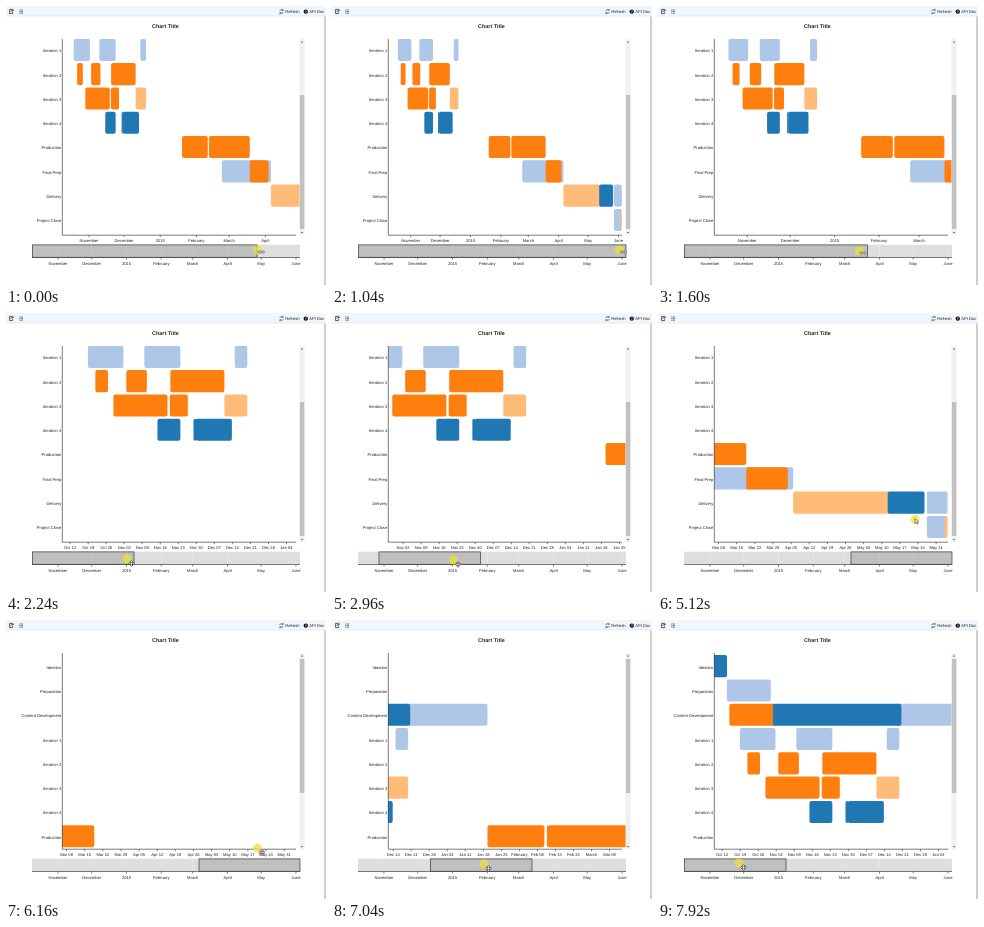
Write an HTML page that moves like this. It is 320 px wide and 279 px high and loops after 8000 ms.

```html
<!DOCTYPE html>
<html lang="en">
<head>
<meta charset="utf-8">
<title>Chart</title>
<style>
  html, body { margin: 0; width: 100%; height: 100%; overflow: hidden; background: #fff; }
  svg { display: block; width: 100%; height: 100%; }
  text { font: 4.1px "Liberation Sans", Arial, sans-serif; fill: #222; text-rendering: geometricPrecision; }
  .mid { text-anchor: middle; }
  .end { text-anchor: end; }
  .title { font-size: 5.4px; font-weight: bold; }
  .axis { fill: none; stroke: #444; stroke-width: .7; }
</style>
</head>
<body>
<svg viewBox="0 0 320 279">
  <defs>
    <clipPath id="plot"><rect x="56" y="32.8" width="238" height="196.2"/></clipPath>
    <clipPath id="names"><rect x="0" y="33" width="56" height="196"/></clipPath>
  </defs>
  <rect width="320" height="279" fill="#fff"/>

  <rect width="320" height="10" fill="#f1f6fc"/>
  <path d="M0 10H320" stroke="#d6dfe8" stroke-width=".6"/>
  <rect x="318" y="10.5" width="2" height="268.5" fill="#cfcfcf"/>
  <path d="M6 3.4H3.6V7.6H6.6V6.2M4.8 5.8Q5 4.2 7.4 4.2M6.2 3L7.5 4.2L6.2 5.4" fill="none" stroke="#333" stroke-width=".8"/>
  <path d="M13 4h.8M14.4 4h2.6M13 5.6h.8M14.4 5.6h2.6M13 7.2h.8M14.4 7.2h2.6" stroke="#444" stroke-width=".7"/>
  <path d="M273.7 5A1.9 1.9 0 0 1 277 4.2M277.2 2.8V4.5H275.5M277.3 6.1A1.9 1.9 0 0 1 274 6.9M273.8 8.3V6.6H275.5" fill="none" stroke="#444" stroke-width=".6"/>
  <text x="279.2" y="7.1">Refresh</text>
  <circle cx="299.8" cy="5.6" r="2.2" fill="#111"/>
  <text class="mid" x="299.8" y="6.9" style="font-size:3.5px;font-weight:bold;fill:#fff">?</text>
  <text x="303.2" y="7.1">API Doc</text>
  <text class="mid title" x="159.4" y="21.5">Chart Title</text>

  <g clip-path="url(#plot)"><g id="bars"></g></g>
  <g clip-path="url(#names)"><g id="labels"></g></g>
  <path class="axis" d="M56.3 33V229.2H290"/>
  <g id="ticks"></g>

  <rect x="293.5" y="33" width="5" height="196" fill="#f0f0f0"/>
  <rect id="thumb" x="293.9" width="4.4" height="134" fill="#c1c1c1"/>
  <path d="M294.9 36.4L296 35L297.1 36.4ZM294.9 226L296 227.4L297.1 226Z" fill="#555"/>

  <rect x="26" y="238.7" width="268" height="12.7" fill="#dedede"/>
  <g id="grid"></g>
  <rect id="brush" y="238.9" height="12.4" fill="#777" fill-opacity=".3" stroke="#444" stroke-width=".75"/>
  <path class="axis" d="M26 251.5H294"/>
  <g id="months"></g>

  <g id="pointer">
    <circle r="4.5" fill="#ece32c" fill-opacity=".7"/>
    <path id="resize" d="M.3 2L2.2 .5V1.4H5.4V.5L7.3 2L5.4 3.5V2.6H2.2V3.5Z" fill="#fff" stroke="#333" stroke-width=".5"/>
    <path id="move" d="M4.5 1.3L5.8 2.8H5V3.9H6.1V3.1L7.6 4.4L6.1 5.7V4.9H5V6H5.8L4.5 7.5L3.2 6H4V4.9H2.9V5.7L1.4 4.4L2.9 3.1V3.9H4V2.8H3.2Z" fill="#fff" stroke="#222" stroke-width=".5"/>
    <path id="arrow" d="M0 -1V4L1.2 2.9L2 4.7L2.8 4.3L2 2.6H3.6Z" fill="#fff" stroke="#222" stroke-width=".5"/>
  </g>
</svg>
<script>
const LOOP = 8000, STEP = 80, DAY = 864e5;
const EPOCH = Date.UTC(2014, 10, 1);
const LEFT = 56, WIDTH = 234, ROW = 24.3, MAX_SCROLL = 75.2;
const BLUE = '#1f77b4', SKY = '#aec7e8', ORANGE = '#ff7f0e', PEACH = '#ffbb78';

// Each task: colour, first day, last day, counted from November 1
const rows = [
  ['Ideation', [BLUE, -24, -18.1]],
  ['Preparation', [SKY, -18.2, -1.1]],
  ['Content Development', [SKY, 47, 79.6], [ORANGE, -17.2, 1], [BLUE, -.3, 49.6]],
  ['Iteration 1', [SKY, -13.1, .7], [SKY, 8.8, 22.8], [SKY, 43.9, 48.8]],
  ['Iteration 2', [ORANGE, -10.2, -5.3], [ORANGE, 1.8, 9.8], [ORANGE, 18.9, 39.9]],
  ['Iteration 3', [ORANGE, -3.2, 17.8], [ORANGE, 18.7, 25.7], [PEACH, 39.9, 48.8]],
  ['Iteration 4', [BLUE, 13.9, 22.8], [BLUE, 27.9, 29], [BLUE, 28.8, 42.8]],
  ['Production', [ORANGE, 79.6, 101.7], [ORANGE, 102.7, 137.7]],
  ['Final Prep', [SKY, 113.8, 155.8], [ORANGE, 137.7, 153.7]],
  ['Delivery', [PEACH, 155.8, 193.5], [BLUE, 192.3, 206.5], [SKY, 207.4, 215.4]],
  ['Project Close', [PEACH, 212, 215.4], [SKY, 207.4, 214.3]]
];

// Keyframes: time, then values
const edgeKeys = [[0, 251], [700, 294], [1080, 294], [2100, 128]];
const dragKeys = [[2800, 26], [3680, 139], [4160, 192.6], [6280, 192.6], [7040, 98], [7760, 26]];
const scrollKeys = [[5480, 1], [5840, 0]];
const pointerKeys = [
  [0, 251.5, 244], [700, 303, 244], [900, 303, 244], [1040, 287.5, 244], [2100, 124, 246],
  [2240, 121, 246], [2560, 101, 247], [2800, 101, 247], [3680, 214, 247], [4160, 267, 247],
  [4640, 262, 245], [5120, 257, 206.5], [5440, 294, 180], [5840, 296, 100],
  [6200, 246, 244], [6280, 246, 244], [7040, 152, 244], [7760, 81, 243]
];

const $ = id => document.getElementById(id);

function at(keys, t, k = 1) {
  if (t <= keys[0][0]) return keys[0][k];
  for (let i = 1; i < keys.length; i++) {
    const a = keys[i - 1], b = keys[i];
    if (t <= b[0]) return a[k] + (b[k] - a[k]) * (t - a[0]) / (b[0] - a[0]);
  }
  return keys[keys.length - 1][k];
}

const overviewX = d => 52 + 1.1226 * d;
const overviewDay = x => (x - 52) / 1.1226;

function tickLabel(date) {
  const name = month => date.toLocaleString('en-US', { month, timeZone: 'UTC' });
  if (date.getUTCDate() > 1) return name('short') + ' ' + String(date.getUTCDate()).padStart(2, '0');
  return date.getUTCMonth() ? name('long') : String(date.getUTCFullYear());
}

// Sundays for short spans, first days of months for long ones
function ticksFor(from, to) {
  const weekly = to - from < 145, list = [];
  for (let d = Math.ceil(from); d <= to; d++) {
    const date = new Date(EPOCH + d * DAY);
    if (weekly ? date.getUTCDay() === 0 : date.getUTCDate() === 1) list.push([d, tickLabel(date)]);
  }
  return list;
}

function axisMarkup(list, scale, y, labelY) {
  return list.map(([d, label]) => {
    const x = scale(d).toFixed(2);
    return `<path class="axis" d="M${x} ${y}v2"/><text class="mid" x="${x}" y="${labelY}">${label}</text>`;
  }).join('');
}

const months = ticksFor(-23.2, 215.6);
$('months').innerHTML = axisMarkup(months, overviewX, 251.5, 259);
$('grid').innerHTML = months.map(([d]) =>
  `<path d="M${overviewX(d)} 238.7v12.7" stroke="#ebebeb" stroke-width=".6"/>`).join('');
$('labels').innerHTML = rows.map(([name], i) =>
  `<text class="end" x="55.2" y="${48.6 + ROW * i}">${name}</text>`).join('');

function draw(t) {
  const left = at(dragKeys, t);
  const right = t < 2800 ? at(edgeKeys, t) : Math.min(294, left + 102);
  const from = overviewDay(left), to = overviewDay(right);
  const x = d => LEFT + (d - from) * WIDTH / (to - from);
  const scroll = at(scrollKeys, t);
  const shift = `translate(0 ${-scroll * MAX_SCROLL})`;

  $('bars').innerHTML = rows.map(([, ...tasks], i) => tasks.map(([color, a, b]) =>
    `<rect x="${x(a)}" y="${35.1 + ROW * i}" width="${x(b) - x(a)}" height="22.1" rx="2" fill="${color}"/>`
  ).join('')).join('');
  $('bars').setAttribute('transform', shift);
  $('labels').setAttribute('transform', shift);
  $('ticks').innerHTML = axisMarkup(ticksFor(from, to), x, 229.2, 236.2);
  $('thumb').setAttribute('y', 39 + 50 * scroll);

  $('brush').setAttribute('x', left + .4);
  $('brush').setAttribute('width', right - left - .4);

  $('pointer').setAttribute('transform', `translate(${at(pointerKeys, t, 1)} ${at(pointerKeys, t, 2)})`);
  const kind = t < 2160 ? 'resize' : t >= 4400 && t < 6160 ? 'arrow' : 'move';
  for (const id of ['resize', 'move', 'arrow']) $(id).style.display = id === kind ? '' : 'none';
}

let shown = -1;
function tick() {
  const t = Math.floor(performance.now() % LOOP / STEP) * STEP;
  if (t !== shown) draw(shown = t);
  requestAnimationFrame(tick);
}
tick();
</script>
</body>
</html>
```
